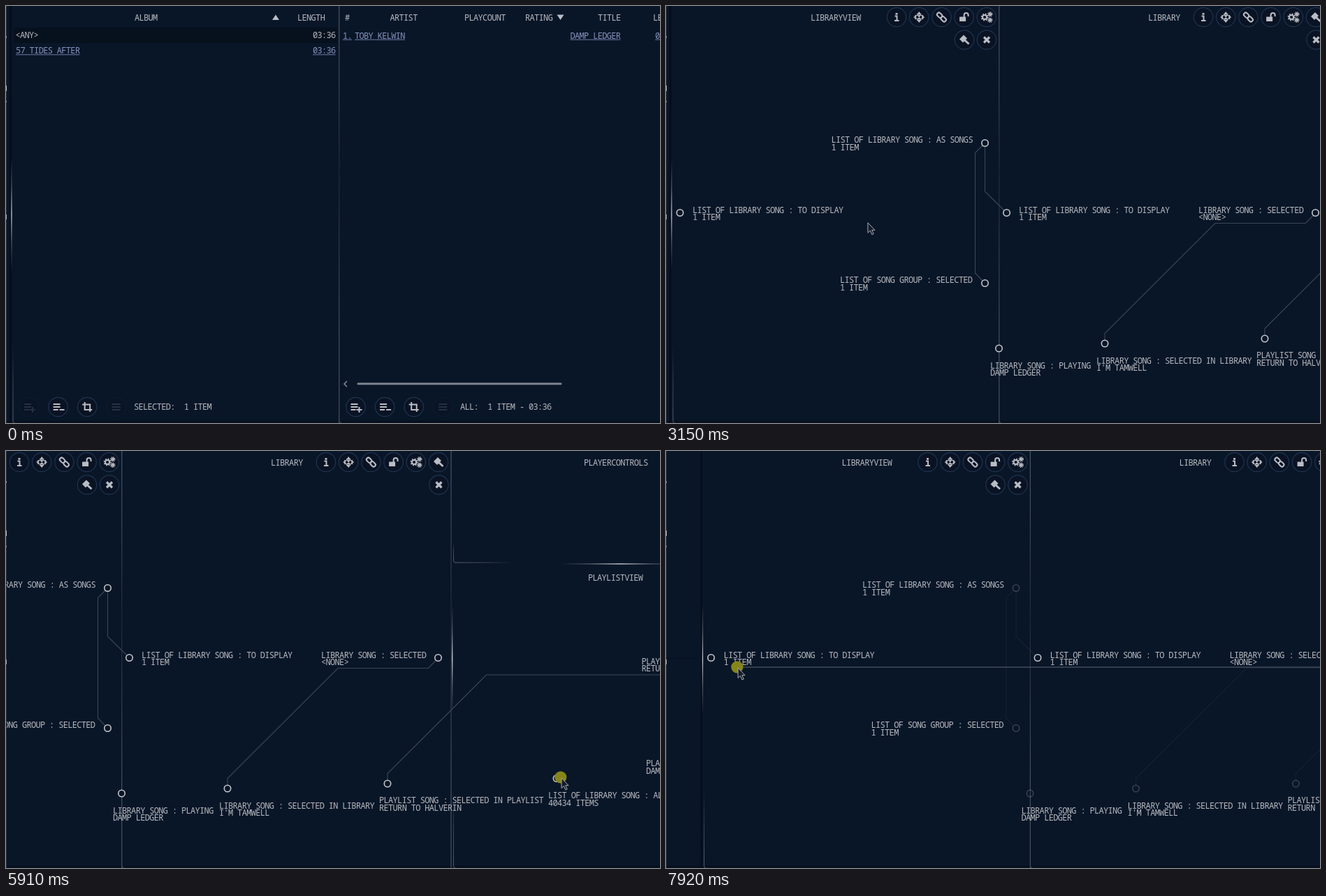
Animation, 936 px wide and 598 px high, one loop 8 s. Source, as an HTML page:

```html
<!DOCTYPE html>
<html lang="en">
<head>
<meta charset="utf-8">
<title>Library layout</title>
<style>
html, body { margin: 0; width: 100%; height: 100%; overflow: hidden; background: #091628; }
svg { display: block; width: 936px; height: 598px; }
text { font: 300 12px "Noto Sans Mono", "DejaVu Sans Mono", monospace; letter-spacing: -.67px; white-space: pre; fill: #b6b9be; }
.link { fill: #8793bd; }
.wire { fill: none; stroke: #3b4754; stroke-width: 1.1; }
.node { fill: #091628; stroke: #c4c7cb; stroke-width: 1.6; }
.btn { fill: #0a1324; stroke: #1f3450; stroke-width: 1.2; }
.icon { fill: none; stroke: #b9bdc4; stroke-width: 2; }
.solid { fill: #b9bdc4; stroke: none; }
</style>
</head>
<body>
<svg id="stage" viewBox="0 0 936 598"></svg>
<script>
const label = (x, y, s, cls = '') =>
  `<text x="${x}" y="${y + 4.4}" class="${cls}">${s.replace(/</g, '&lt;')}</text>`;
const path = (d, cls, extra = '') => `<path d="${d}" class="${cls}" ${extra}/>`;
const rect = (x, y, w, h, fill) => `<rect x="${x}" y="${y}" width="${w}" height="${h}" fill="${fill}"/>`;
const link = (x, y, s) => label(x, y, s, 'link') + rect(x, y + 5.3, s.length * 6.53, 1, '#6f7ba6');
const node = (x, y, input) => `<circle cx="${x}" cy="${y}" r="4.7" class="node ${input ? '' : 'dim'}"/>`;

const lines = path('M-7 -4H3M-7 0H3M-7 4H0', 'icon', 'stroke-width="1.7"');
const gear = (x, y, r) =>
  `<circle cx="${x}" cy="${y}" r="${r}" class="icon"/>` +
  `<circle cx="${x}" cy="${y}" r="${r + 1.4}" class="icon" stroke-dasharray="${(r + 1.4) * Math.PI / 8}"/>`;
const icons = {
  info: path('M-2.5 -1.5H.5V5M-3 5H3.5', 'icon') + rect(-1.5, -6, 3, 2.6, '#b9bdc4'),
  move: path('M0 -6V6M-6 -2.5H6M-6 2.5H6M-3 -5L3 5M3 -5L-3 5', 'icon', 'style="stroke-width:1.1"') +
    path('M0 -8L3 -4H-3ZM0 8L3 4H-3ZM-8 0L-4 -3V3ZM8 0L4 -3V3Z', 'solid'),
  chain: '<g transform="rotate(45)">' +
    '<rect x="-8" y="-2.7" width="8" height="5.4" rx="2.5" class="icon"/>' +
    '<rect x="0" y="-2.7" width="8" height="5.4" rx="2.5" class="icon"/></g>',
  lock: rect(-6.5, -.5, 9, 6.5, '#b9bdc4') + path('M0 0V-3Q0 -6 3 -6T6 -3V-1', 'icon'),
  gears: gear(-2.7, 0, 3.1) + gear(5, -4.2, 1.4) + gear(5, 4.2, 1.4),
  gavel: path('M-7 -1L-1 -7L4 -2L-2 4Z', 'solid') + path('M0 0L6.5 6', 'icon', 'style="stroke-width:3"'),
  close: path('M-4 -4L4 4M4 -4L-4 4', 'icon', 'style="stroke-width:3.2"'),
  add: lines + path('M5 0V8M1 4H9', 'icon'),
  remove: lines + path('M2 4H9', 'icon'),
  crop: path('M-3.5 -7V4H7M-7 -3.5H4V7', 'icon'),
  rows: path('M-6 -4H6M-6 0H6M-6 4H6', 'icon')
};
const button = (name, x, y, opacity = 1) =>
  `<g transform="translate(${x} ${y})" opacity="${opacity}"><circle r="13.7" class="btn"/>${icons[name]}</g>`;
const toolbar = (x, names) => names.map((n, i) => button(n, x + i * 32.2, 16)).join('');
const footer = x => ['add', 'remove', 'crop', 'rows'].map((n, i) =>
  button(n, x + i * 41.6, 575, i == 3 || (x < 100 && !i) ? .16 : 1)).join('');

const fade = (id, vertical, stops) =>
  `<linearGradient id="${id}" x1="0" y1="0" x2="${vertical ? 0 : 1}" y2="${vertical ? 1 : 0}">` +
  stops.map((o, i) => `<stop offset="${i / (stops.length - 1)}" stop-color="#c8ccd2" stop-opacity="${o}"/>`).join('') +
  '</linearGradient>';
const corner = x => rect(x - .5, 488, 1, 107, 'url(#down)') + path(`M${x} 595Q${x} 598 ${x + 3} 598`, 'wire');

const frame =
  rect(5, 0, 2.5, 598, '#050d1a') + rect(-60, 296.5, 65, 1, '#06101e') +
  rect(-400, 595, 2000, 2.5, '#060f1d') +
  rect(7.3, 220, 1.3, 158, 'url(#glowV)') + corner(10) +
  rect(476.3, 0, 1, 598, 'url(#side)') + path('M477 595Q477 598 480 598', 'wire') +
  rect(947.5, 0, 1, 598, 'url(#side)') + rect(949, 220, 1.4, 155, 'url(#glowV)') +
  rect(951, 130, 1, 27, 'url(#down)') + path('M951.5 157Q951.5 160 954.5 160', 'wire') +
  rect(954, 159.5, 85, 1, 'url(#right)') + rect(1105, 161.2, 170, 1.4, 'url(#glowH)') + corner(951.5);

const list =
  rect(11, 31, 463, 22, '#07101d') +
  label(184, 17, 'ALBUM') + path('M381 20L386 12.5L391 20Z', 'solid') + label(417, 17, 'LENGTH') +
  label(485, 17, '#') + label(549.5, 17, 'ARTIST') + label(656, 17, 'PLAYCOUNT') + label(743, 17, 'RATING') +
  path('M788.5 12.5H798.5L793.5 20Z', 'solid') + label(847, 17, 'TITLE') + label(926, 17, 'LENGTH') +
  label(13.5, 42, '<ANY>') + label(439, 42, '03:36') +
  link(14, 64, '57 TIDES AFTER') + link(439, 64, '03:36') +
  link(482, 42.5, '1.') + link(499, 42.5, 'TOBY KELWIN') + link(807.5, 42.5, 'DAMP LEDGER') + link(929, 42.5, '03:36') +
  path('M488 538L484 542L488 546', 'icon', 'style="stroke-width:1.5" opacity=".7"') +
  path('M504 541.8H794', 'icon', 'stroke-linecap="round" opacity=".65" style="stroke-width:3"') +
  footer(33) + label(183, 575, 'SELECTED:  1 ITEM') +
  footer(500.5) + label(650, 575, 'ALL:  1 ITEM - 03:36');

const hoverWire = 'M628 484V469.5L786 311.5H915.5L929.5 297';
const wires = [
  'M456.5 201V266L484 293', 'M453 200L442.5 210.5V383L453 394', hoverWire,
  'M857 477V462.5L998.5 321H1400'
];
const nodes = [
  [456.5, 196.5], [487.5, 296.5, 1], [456.5, 397.5], [476.5, 491], [20, 296.5, 1],
  [628, 484], [929.5, 296.5], [857, 477], [1099, 469.5]
];
const notes = [
  [236.5, 192, 'LIST OF LIBRARY SONG : AS SONGS', '1 ITEM'],
  [38, 292.7, 'LIST OF LIBRARY SONG : TO DISPLAY', '1 ITEM'],
  [505, 292.7, 'LIST OF LIBRARY SONG : TO DISPLAY', '1 ITEM'],
  [762, 292.7, 'LIBRARY SONG : SELECTED', '<NONE>'],
  [249, 393, 'LIST OF SONG GROUP : SELECTED', '1 ITEM'],
  [464, 515.5, 'LIBRARY SONG : PLAYING', 'DAMP LEDGER'],
  [616, 508.3, 'LIBRARY SONG : SELECTED IN LIBRARY', "I'M TAMWELL"],
  [845, 501, 'PLAYLIST SONG : SELECTED IN PLAYLIST', 'RETURN TO HALVERIN'],
  [1087, 494, 'LIST OF LIBRARY SONG : ALL', '40434 ITEMS'],
  [1220.5, 301.7, 'PLAYLIST SONG : SELECTED', 'RETURN TO HALVERIN'],
  [1227, 448, 'PLAYLIST SONG : PLAYING', 'DAMP LEDGER']
];
const tools = ['info', 'move', 'chain', 'lock', 'gears'];
const layout =
  label(207, 17, 'LIBRARYVIEW') + label(690, 17, 'LIBRARY') +
  label(1138, 17, 'PLAYERCONTROLS') + label(1144, 182, 'PLAYLISTVIEW') +
  toolbar(330, tools) + button('gavel', 427, 48.5) + button('close', 459, 48.5) +
  toolbar(769, [...tools, 'gavel']) + button('close', 930.5, 48.5) +
  wires.map(d => path(d, 'wire dim')).join('') +
  path(hoverWire, 'wire', 'id="hover" style="stroke:#fccb62;stroke-width:2.2"') +
  nodes.map(n => node(...n)).join('') +
  `<g id="notes">${notes.map(([x, y, a, b]) => label(x, y, a) + label(x, y + 10.3, b)).join('')}</g>`;

const stage = document.getElementById('stage');
stage.innerHTML =
  '<defs>' + fade('glowV', 1, [0, .35, 1, .35, 0]) + fade('glowH', 0, [0, .35, 1, .35, 0]) +
  fade('side', 1, [.42, .3, .12, .25, .38, .38]) + fade('down', 1, [0, .25, .38]) + fade('right', 0, [.4, .25, 0]) +
  `</defs><g id="world">${frame}<g id="list">${list}</g><g id="layout">${layout}</g></g>` +
  rect(0, 0, 1, 598, '#2a3543') + rect(0, 43, 1, 3, '#8b9199') + rect(0, 114, 1, 8, '#c0c4c8') +
  rect(0, 136, 1, 2, '#8b9199') + rect(0, 299, 1, 7, '#b0b4ba') +
  path('', 'wire', 'id="drag" style="stroke:#5d6670"') +
  '<circle id="press" r="8.6" fill="#86851a"/>' +
  '<path id="cursor" d="M0 0V14.5L3.4 11.4L5.8 17L8.2 16L5.8 10.6H10Z" fill="#141c29" stroke="#a9adb2"/>';
const $ = id => document.getElementById(id);
const dimmed = [...document.querySelectorAll('.dim')];

// Keys: time, then values
const pointer = [
  [0, 890, 612], [400, 890, 612], [840, 699, 401], [2200, 699, 401], [3000, 312, 336], [3150, 289, 311],
  [3330, 273, 268], [3450, 285, 260], [3850, 753, 432], [4260, 590, 432], [4720, 442, 427], [4860, 442, 427],
  [5590, 795, 469], [6230, 795, 469], [6920, 344.5, 371], [7070, 300, 356], [7540, 140, 318],
  [7650, 140, 318], [7920, 103, 311], [8000, 103, 311]
];
const pan = [
  [0, 0], [3880, 0], [4260, -144], [4720, -309], [4800, -310], [4860, -310], [4940, -311],
  [7080, -311], [7540, 23], [7640, 23], [7920, 44.5], [8000, 44.5]
];
const presses = [[840, 920], [3890, 4760], [5910, 8000]];

function at(keys, t) {
  const i = keys.findIndex(k => k[0] > t), a = keys[i - 1], b = keys[i];
  const k = (t - a[0]) / (b[0] - a[0]);
  return a.slice(1).map((v, j) => v + (b[j + 1] - v) * k);
}
const ramp = (t, a, b) => Math.min(1, Math.max(0, (t - a) / (b - a)));

function draw(now) {
  const t = now % 8000;
  const [x, y] = at(pointer, t), [off] = at(pan, t);
  const dim = 1 - .76 * ramp(t, 6250, 6500);

  $('world').setAttribute('transform', `translate(${off} 0)`);
  $('list').style.opacity = 1 - ramp(t, 1420, 1760);
  $('layout').style.opacity = ramp(t, 1600, 2000);
  $('hover').style.opacity = 1 - ramp(t, 2230, 2400);
  $('notes').style.opacity = ramp(t, 2300, 2800);
  dimmed.forEach(e => e.style.opacity = dim);

  const nx = 1099 + off, ny = 469.5;
  $('drag').setAttribute('d', `M${x - 1} ${y - 1}H${nx - Math.abs(ny - y + 1)}L${nx} ${ny}`);
  $('drag').style.opacity = t > 6280 ? 1 : 0;
  $('press').setAttribute('transform', `translate(${x - 1.2} ${y - 1.2})`);
  $('press').style.opacity = presses.some(([a, b]) => t >= a && t < b) ? 1 : 0;
  $('cursor').setAttribute('transform', `translate(${x} ${y})`);
  requestAnimationFrame(draw);
}
requestAnimationFrame(draw);
</script>
</body>
</html>
```
